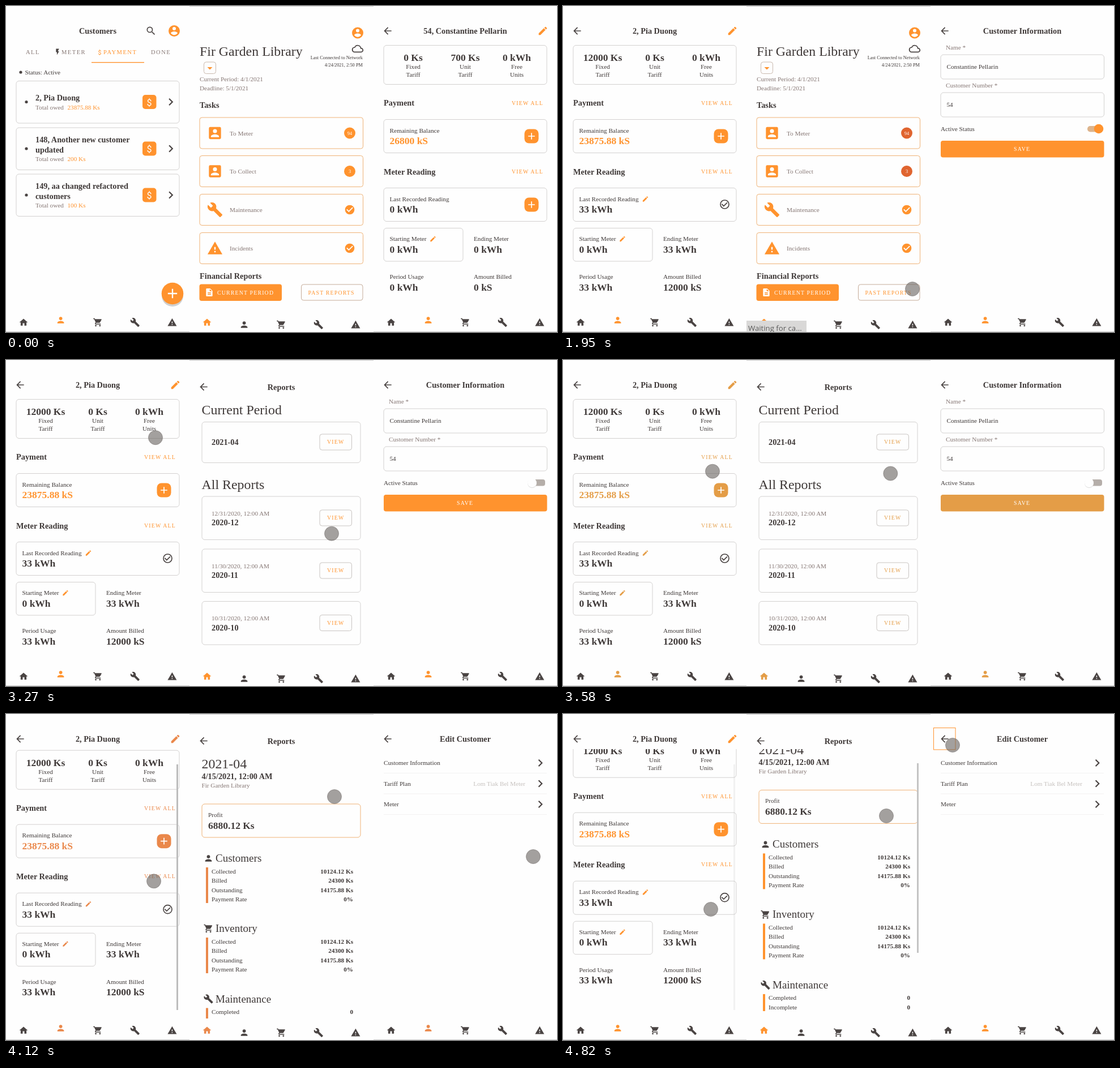
These frames come from a looping animation (973 px wide and 576 px high, 4900 ms). An HTML page:

```html
<!DOCTYPE html>
<html lang="en">
<head>
<meta charset="utf-8">
<title>Meter app screens</title>
<style>
  html, body { margin: 0; width: 100%; height: 100%; overflow: hidden; background: #fefefe; }
  #stage { display: block; --accent: #ff932e; --badge: #ff932e; }
  text { font-family: "Liberation Serif", serif; fill: #3f3938; white-space: pre; }
  .s { font-size: 11.2px; }
  .xs { font-size: 8.4px; }
  .h { font-size: 14.3px; font-weight: bold; }
  .v { font-size: 17.5px; font-weight: bold; }
  .sb { font-size: 11.2px; font-weight: bold; }
  .big { font-size: 23.9px; }
  .mid { font-size: 19px; }
  .btn { font-size: 9.8px; letter-spacing: 1.2px; }
  .tab { font-size: 10.5px; letter-spacing: 1.5px; }
  .sans { font-family: Roboto, sans-serif; }
  .status { font: 13.2px "Open Sans", sans-serif; fill: #5a5a5a; }
  .o { fill: var(--accent); }
  .m { fill: #857673; }
  .pale { fill: #c6c1be; }
  .w { fill: #fff; }
  .c { text-anchor: middle; }
  .e { text-anchor: end; }
  .touch { fill: #6b6563; fill-opacity: .62; stroke: #6b6563; stroke-opacity: .5; }
</style>
</head>
<body>
<svg id="stage" width="973" height="576" viewBox="0 0 973 576"></svg>
<script>
const LOOP = 4900;
const DARK = '#4a4443', ACCENT = 'var(--accent)', LINE = '#d3d1d0', WARM = '#efb276';
const LIBRARY = 'Fir Garden Library', FIRST = '2, Pia Duong', SECOND = 'Constantine Pellarin';

// Icons on a 24-unit grid
const disc = 'M2 12a10 10 0 1 1 20 0a10 10 0 1 1-20 0z';
const ICONS = {
  home: 'M10 20v-6h4v6h5v-8h3L12 3 2 12h3v8z',
  person: 'M8 8a4 4 0 1 1 8 0a4 4 0 1 1-8 0zM4 20v-2c0-2.7 5.3-4 8-4s8 1.3 8 4v2z',
  cart: 'M1 2h3.3l.9 2H20a1 1 0 0 1 .9 1.5l-3.6 6.5a2 2 0 0 1-1.7 1H8.1l-1 2H19v2H7a2 2 0 0 1-1.75-3L6.6 11.6 3 4H1z' +
    'M5 20a2 2 0 1 1 4 0a2 2 0 1 1-4 0zM15 20a2 2 0 1 1 4 0a2 2 0 1 1-4 0z',
  wrench: 'M22.7 19l-9.1-9.1c.9-2.3.4-5-1.5-6.9-2-2-5-2.4-7.4-1.3L9 6 6 9 1.6 4.7C.4 7.1.9 10.1 2.9 12.1c1.9 1.9 4.6 2.4 6.9 1.5l9.1 9.1c.4.4 1 .4 1.4 0l2.3-2.3c.5-.4.5-1.1.1-1.4z',
  warning: 'M1 21h22L12 2zm12-3h-2v-2h2zm0-4h-2v-4h2z',
  search: 'M3 9.5a6.5 6.5 0 1 1 13 0a6.5 6.5 0 1 1-13 0zM5 9.5a4.5 4.5 0 1 0 9 0a4.5 4.5 0 1 0-9 0zM13.5 14.9l1.4-1.4 5.6 5.5-1.5 1.5z',
  account: disc + 'M9 8a3 3 0 1 0 6 0a3 3 0 1 0-6 0zM6 16a7.2 7.2 0 0 0 12 0c0-2-4-3.1-6-3.1s-6 1.1-6 3.1z',
  contact: 'M3 5a2 2 0 0 1 2-2h14a2 2 0 0 1 2 2v14a2 2 0 0 1-2 2H5a2 2 0 0 1-2-2zM9 9a3 3 0 1 0 6 0a3 3 0 1 0-6 0zM6 17v1h12v-1c0-2-4-3.1-6-3.1s-6 1.1-6 3.1z',
  edit: 'M3 17.25V21h3.75L17.8 9.95 14.05 6.2zM20.7 7a1 1 0 0 0 0-1.4L18.4 3.3a1 1 0 0 0-1.4 0l-1.85 1.8 3.75 3.75z',
  back: 'M20 11H7.8l5.6-5.6L12 4l-8 8 8 8 1.4-1.4L7.8 13H20z',
  chevron: 'M10 6L8.6 7.4 13.2 12l-4.6 4.6L10 18l6-6z',
  check: disc + 'M10 17l9-9-1.4-1.4-7.6 7.6-3.6-3.6L5 12z',
  checkRing: disc + 'M4 12a8 8 0 1 0 16 0a8 8 0 1 0-16 0zM10 17l8-8-1.4-1.4-6.6 6.6-3.6-3.6L5 12z',
  cloud: 'M6 20a6 6 0 0 1-.65-12A7.5 7.5 0 0 1 19.35 10 5 5 0 0 1 19 20zM6 18h13a3 3 0 0 0 0-6h-1.5v-.5a5.5 5.5 0 0 0-10.8-1.5H6a4 4 0 0 0 0 8z',
  page: 'M14 2H6a2 2 0 0 0-2 2v16a2 2 0 0 0 2 2h12a2 2 0 0 0 2-2V8zm2 16H8v-2h8zm0-4H8v-2h8zm-3-5V3.5L18.5 9z',
  bolt: 'M7 2v11h3v9l7-12h-4l4-8z',
  add: 'M19 13h-6v6h-2v-6H5v-2h6V5h2v6h6z'
};

const text = (x, y, str, cls = 's') => `<text x="${x}" y="${y}" class="${cls}">${str}</text>`;
const icon = (name, cx, cy, size, fill = DARK) =>
  `<path d="${ICONS[name]}" fill="${fill}" transform="translate(${cx - size / 2} ${cy - size / 2}) scale(${size / 24})"/>`;
const rect = (x, y, w, h, fill, r = 0) => `<rect x="${x}" y="${y}" width="${w}" height="${h}" rx="${r}" fill="${fill}"/>`;
const card = (x, y, w, h, stroke = LINE, r = 5) =>
  `<rect x="${x}" y="${y}" width="${w}" height="${h}" rx="${r}" fill="none" stroke="${stroke}"/>`;
const circle = (cx, cy, r, fill) => `<circle cx="${cx}" cy="${cy}" r="${r}" fill="${fill}"/>`;
const shift = (x, body) => `<g transform="translate(${x})">${body}</g>`;
const span = (from, to, body) => `<g data-from="${from}" data-to="${to}">${body}</g>`;
const scroller = (id, x, body) =>
  `<svg x="${x}" y="62" width="324" height="476" viewBox="${x} 62 324 476"><g id="${id}">${body}</g></svg>`;
const header = (title, cx, y = 44) => icon('back', cx - 137, y, 20) + text(cx, y + 5, title, 'h c');
const squarePlus = (cx, cy) => rect(cx - 12.5, cy - 12.5, 25, 25, ACCENT, 8) + icon('add', cx, cy, 20, '#fff');

function nav(x, active, y) {
  return ['home', 'person', 'cart', 'wrench', 'warning'].map((name, i) =>
    icon(name, x + 31 + i * 65.6, i === active ? y - 4 : y, 17.5, i === active ? ACCENT : DARK)).join('');
}

function customerList() {
  const row = (y, lines, owed) => {
    const mid = y + 37, sub = lines.length > 1 ? y + 59 : y + 50;
    return card(18, y, 288, 74.5) + circle(36, mid, 2.6, DARK) +
      lines.map((line, i) => text(52, y + (lines.length > 1 ? 26 : 34) + i * 17.5, line, 'h')).join('') +
      text(52, sub, 'Total owed', 's m') + text(108.5, sub, owed + ' Ks', 's o') +
      rect(241, mid - 12.5, 24.5, 25, ACCENT, 5) + text(253, mid + 6, '$', 'sans w c') +
      icon('chevron', 291, mid, 26);
  };
  return text(162, 49, 'Customers', 'h c') + icon('search', 256, 44, 20) + icon('account', 297, 44, 24, ACCENT) +
    text(35, 84.5, 'ALL', 'tab m') + icon('bolt', 91, 81, 13) + text(98, 84.5, 'METER', 'tab m') +
    text(162.5, 85.5, '$', 'tab sans o') + text(172, 84.5, 'PAYMENT', 'tab o') + text(256, 84.5, 'DONE', 'tab m') +
    rect(151, 99, 93, 1.4, ACCENT) + circle(26, 117, 2.6, DARK) + text(33.5, 121, 'Status: Active') +
    row(132.5, [FIRST], '23875.88') +
    row(215, ['148, Another new customer', 'updated'], '200') +
    row(297, ['149, aa changed refactored', 'customers'], '100') +
    `<circle cx="294" cy="512" r="19" fill="#000" opacity=".18"/>` + circle(294, 508, 19.3, ACCENT) + icon('add', 294, 508, 28, '#fff');
}

function customerDetail(id, c) {
  const tariff = (x, value, top, low) => text(x, 97, value, 'v c') + text(x, 111, top, 's c') + text(x, 125, low, 's c');
  const field = (x, y, label, value, tone = '') => text(x, y, label) + text(x, y + 20.5, value, 'v ' + tone);
  const viewAll = y => text(244, y, 'VIEW ALL', 'btn o');
  const pencil = (x, y) => icon('edit', x, y, 12.5, ACCENT);
  const body = card(18, 69.5, 288, 69) +
    tariff(70, c.fixed, 'Fixed', 'Tariff') + tariff(162, c.unit, 'Unit', 'Tariff') + tariff(253, '0 kWh', 'Free', 'Units') +
    text(18, 176, 'Payment', 'h') + viewAll(175) +
    card(18, 200.5, 288, 59) + field(28.5, 223.5, 'Remaining Balance', c.balance, 'o') + squarePlus(279, 230) +
    text(18, 297.5, 'Meter Reading', 'h') + viewAll(295.5) +
    card(18, 321.5, 288, 59) + field(28.5, 344.5, 'Last Recorded Reading', c.reading) +
    (c.recorded ? pencil(145.5, 341) + icon('checkRing', 285.5, 350.5, 20) : squarePlus(279, 351)) +
    card(18, 392.5, 140, 58.5) + field(28.5, 415, 'Starting Meter', '0 kWh') + pencil(105, 411.5) +
    field(177, 415, 'Ending Meter', c.reading) +
    field(28.5, 482, 'Period Usage', c.reading) + field(177, 482, 'Amount Billed', c.billed);
  return header(c.title, 162) + icon('edit', 299, 44, 19.5, ACCENT) + scroller(id, 0, body);
}

function home() {
  const task = (y, name, label, mark) => card(342, y, 288.5, 55, WARM, 4) + icon(name, 369, y + 27.5, 28.5, ACCENT) +
    text(395, y + 31.5, label, 's m') +
    (mark ? circle(607, y + 27.5, 10, 'var(--badge)') + text(607, y + 30.5, mark, 'xs w c')
          : icon('check', 607, y + 27.5, 20, ACCENT));
  return icon('account', 621, 47.5, 24, ACCENT) + text(342, 88, LIBRARY, 'big') + icon('cloud', 621, 75.5, 20) +
    text(630, 94, 'Last Connected to Network', 'xs e') + text(630, 106.5, '4/24/2021, 2:50 PM', 'xs e') +
    card(349.5, 99, 21, 20.5, '#c9b9ad', 4) + `<path d="M355.500 108h9l-4.500 4.500z" fill="${ACCENT}"/>` +
    text(342, 133, 'Current Period: 4/1/2021', 's m') + text(342, 149, 'Deadline: 5/1/2021', 's m') +
    text(342, 180, 'Tasks', 'h') +
    task(197, 'contact', 'To Meter', '94') + task(264.5, 'contact', 'To Collect', '3') +
    task(332.5, 'wrench', 'Maintenance') + task(400.5, 'warning', 'Incidents') +
    text(342, 482, 'Financial Reports', 'h') +
    rect(341.5, 491.5, 145.5, 29.5, ACCENT, 4) + icon('page', 359, 506, 17, '#fff') + text(373, 509.5, 'CURRENT PERIOD', 'btn w') +
    card(521.5, 492, 108.5, 28, '#c5ac99', 4) + text(533.5, 509.5, 'PAST REPORTS', 'btn o');
}

function reportList() {
  const view = y => card(554, y - 14, 56.5, 28, '#c9c5c2', 4) + text(567, y + 3, 'VIEW', 'btn o');
  const past = (y, date, id) => card(346, y, 280, 76.5) + text(363, y + 33.5, date, 's m') + text(363, y + 51, id, 'h') + view(y + 38);
  return header('Reports', 486, 47.5) + text(345.5, 96, 'Current Period', 'big') +
    card(346, 109.5, 280, 72) + text(363, 150, '2021-04', 'h') + view(145) +
    text(345.5, 227.5, 'All Reports', 'big') +
    past(241, '12/31/2020, 12:00 AM', '2020-12') +
    past(334, '11/30/2020, 12:00 AM', '2020-11') +
    past(426.5, '10/31/2020, 12:00 AM', '2020-10');
}

function report() {
  const section = (y, name, title, rows) => icon(name, 357.5, y, 17.5) + text(370, y + 6, title, 'mid') +
    rect(353, y + 16, 4, rows.length * 16.5 - 3, ACCENT) +
    rows.map(([label, value], i) => text(363, y + 26.5 + i * 16.5, label) + text(613, y + 26.5 + i * 16.5, value, 'sb e')).join('');
  const money = [['Collected', '10124.12 Ks'], ['Billed', '24300 Ks'], ['Outstanding', '14175.88 Ks'], ['Payment Rate', '0%']];
  return header('Reports', 486, 47.5) + scroller('reportScroll', 324,
    text(345.5, 96, '2021-04', 'big') + text(345.5, 114.5, '4/15/2021, 12:00 AM', 'h') + text(345.5, 130, LIBRARY, 's m') +
    card(346, 159, 280, 59, WARM) + text(357, 182, 'Profit') + text(357, 203, '6880.12 Ks', 'v') +
    section(255, 'person', 'Customers', money) + section(379, 'cart', 'Inventory', money) +
    section(503.5, 'wrench', 'Maintenance', [['Completed', '0'], ['Incomplete', '0']]));
}

function customerForm() {
  const input = (y, label, value) => text(676, y - 9, label, 's m') + card(667, y, 288.5, 43) + text(677.5, y + 25, value);
  return header('Customer Information', 811) + input(86, 'Name *', SECOND) + input(153, 'Customer Number *', '54') +
    text(667, 220.5, 'Active Status') +
    span(0, 2490, rect(926, 212, 24, 10.5, '#ddb48c', 5) + circle(946, 217, 8.3, ACCENT)) +
    span(2490, LOOP, rect(928, 211, 24, 11.5, '#b5aea9', 4) + circle(929, 218, 8, '#ddd') + circle(929, 217, 8, '#fefefe')) +
    span(0, 3740, rect(667, 238, 288.5, 29.5, ACCENT, 4) + text(796, 256, 'SAVE', 'btn w')) +
    span(3740, LOOP, rect(667, 238, 288.5, 29.5, '#dcdbda', 4) +
      `<path id="spinner" d="M815 244.500A8.500 8.500 0 0 0 806 260" fill="none" stroke="${ACCENT}" stroke-width="1.8"/>`);
}

function editMenu() {
  const row = (y, label) => text(667, y + 4, label) + icon('chevron', 943.5, y + .5, 26) + rect(667, y + 18, 288, 1, '#f3f2f2');
  return header('Edit Customer', 811) + row(86, 'Customer Information') + row(122.5, 'Tariff Plan') + row(159, 'Meter') +
    text(917, 126.5, 'Lom Tiak Bel Meter', 's pale e');
}

const statusBar = (x, y, str, fill) => rect(x, y, 106, 24, fill) + text(x + 3, y + 17.5, str, 'status');

// Pointer paths: [time, x, y]; shown from the first to the last time
const touches = [
  [[1180, 94, 162], [1340, 94, 162]],
  [[3040, 264, 110], [3270, 264, 137], [3890, 264, 256], [4360, 258, 336], [4820, 261, 345], [LOOP, 261, 345]],
  [[1180, 627, 497], [1340, 627, 497], [1950, 617, 500], [2490, 617, 500]],
  [[2810, 600, 420], [3270, 575, 307], [3740, 580, 146], [4440, 580, 146], [4820, 571, 180], [LOOP, 571, 180]],
  [[1180, 954, 33], [1340, 954, 33]],
  [[3740, 931, 252], [4520, 931, 252], [4740, 688, 55], [LOOP, 688, 55]]
];
const PRESS = 3;

const stage = document.getElementById('stage');
stage.innerHTML =
  rect(0, 575, 324, 1, '#cfcfcf') + rect(649, 575, 324, 1, '#cfcfcf') + rect(324, 0, 325, 1, '#cfcfcf') +
  span(0, 1340, customerList()) +
  span(1340, LOOP, customerDetail('detailScroll', {
    title: FIRST, fixed: '12000 Ks', unit: '0 Ks', balance: '23875.88 kS', reading: '33 kWh', billed: '12000 kS', recorded: true })) +
  span(0, 2490, home()) + span(2490, 4120, reportList()) + span(4120, LOOP, report()) +
  span(0, 1340, shift(649, customerDetail('otherScroll', {
    title: '54, ' + SECOND, fixed: '0 Ks', unit: '700 Ks', balance: '26800 kS', reading: '0 kWh', billed: '0 kS' }))) +
  span(1340, 1870, editMenu()) + span(1870, 4120, customerForm()) + span(4120, LOOP, editMenu()) +
  nav(0, 1, 559) + nav(324, 0, 563) + nav(649, 1, 559) +
  span(1870, 2490, statusBar(324, 556, 'Waiting for ca...', '#d9d8d7')) +
  span(4280, 4590, statusBar(649, 552, 'Waiting for lo...', '#ced6d5')) +
  span(4670, LOOP, card(654.5, 24.5, 38.5, 38.5, ACCENT, 0)) +
  `<g id="detailBar">${rect(301, 89, 3, 434, '#bdbdbd')}</g><g id="reportBar">${rect(625, 87, 3, 335, '#c4c4c4')}</g>` +
  touches.map(() => '<circle class="touch" r="12.500"/>').join('');

const byId = id => document.getElementById(id);
const spans = [...stage.querySelectorAll('[data-from]')];
const dots = [...stage.querySelectorAll('.touch')];
const ramp = (t, from, to) => Math.min(1, Math.max(0, (t - from) / (to - from)));
const ease = p => p * p * (3 - 2 * p);

function place(dot, path, t) {
  const next = path.findIndex(key => key[0] > t);
  dot.style.display = next > 0 ? '' : 'none';
  if (next < 1) return;
  const [a, b] = [path[next - 1], path[next]], p = ramp(t, a[0], b[0]);
  dot.setAttribute('cx', a[1] + (b[1] - a[1]) * p);
  dot.setAttribute('cy', a[2] + (b[2] - a[2]) * p);
}

function draw() {
  const t = performance.now() % LOOP;
  for (const g of spans) g.style.display = t >= +g.dataset.from && t < +g.dataset.to ? '' : 'none';
  touches.forEach((path, i) => place(dots[i], path, t));

  const pressed = t >= 3820 && t < 4120;
  dots[PRESS].style.fill = pressed ? ACCENT : '';
  dots[PRESS].style.fillOpacity = pressed ? 1 : '';

  const accent = t >= 3580 && t < 4120 ? '#e49d47' : t >= 4120 && t < 4670 ? '#ea884b' : '#ff932e';
  stage.style.setProperty('--accent', accent);
  stage.style.setProperty('--badge', t >= 1710 && t < 2490 ? '#e0642f' : accent);

  byId('detailScroll').setAttribute('transform', `translate(0 ${-26.3 * ease(ramp(t, 4040, 4320))})`);
  byId('reportScroll').setAttribute('transform', `translate(0 ${-24.6 * ease(ramp(t, 4480, 4740))})`);
  byId('detailBar').style.opacity = t < 4040 ? 0 : 1 - .8 * ramp(t, 4520, 4800);
  byId('reportBar').style.opacity = t < 4480 ? 0 : 1;
  byId('spinner').setAttribute('transform', `rotate(${(t - 3890) * 360 / 1400} 811 252.5)`);
  requestAnimationFrame(draw);
}
draw();
</script>
</body>
</html>
```
